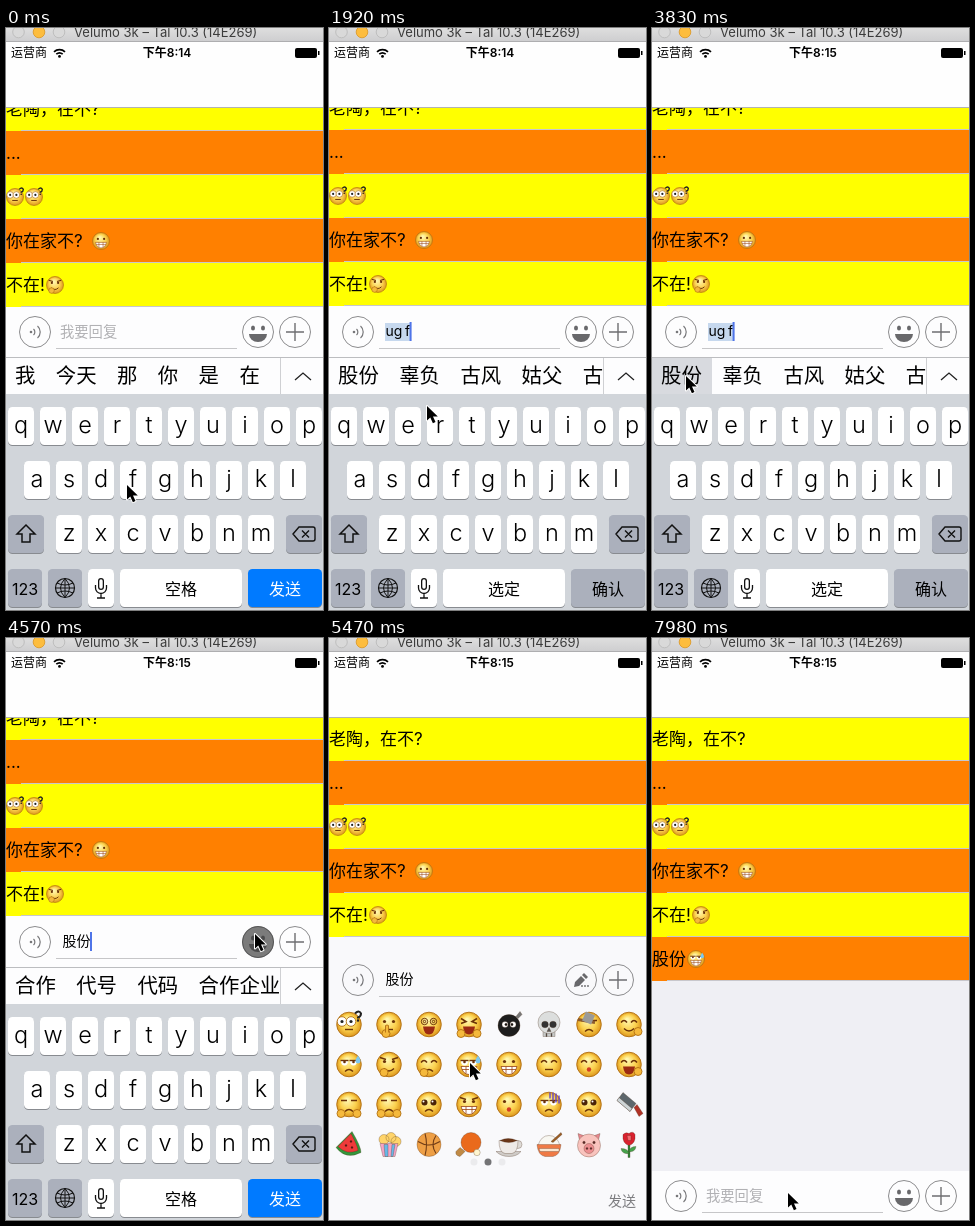
Write an HTML page with a canvas that moves like this. It is 317 by 582 pixels and loops after 8 s.

```html
<!DOCTYPE html>
<html lang="zh">
<head>
<meta charset="utf-8">
<style>
html, body { margin: 0; width: 100%; height: 100%; overflow: hidden; background: #fff; }
canvas { display: block; width: 317px; height: 582px; }
</style>
</head>
<body>
<canvas id="stage" width="317" height="582"></canvas>
<script>
const ctx = document.getElementById('stage').getContext('2d');
const W = 317, H = 582, LOOP = 8000, STEP = 147.2;
const FONT = 'Inter, "Noto Sans CJK SC", "Noto Sans CJK", sans-serif';

// Motion tracks: [step, values...], linear in between
const POINTER = [[0, 121, 457], [2, 203, 400], [3, 204, 398], [5, 158, 452], [6, 156, 451], [8, 124, 455],
  [9, 122, 450], [13, 98, 378], [16, 92, 385], [20, 283, 474], [22, 260, 455], [24, 85, 385], [26, 34, 348],
  [27, 35, 347], [30, 235, 302], [31, 249, 296], [32, 225, 318], [33, 157, 368], [35, 150, 405], [37, 141, 425],
  [38, 140, 427], [39, 140, 427], [44, 278, 553], [46, 293, 561], [47, 293, 562], [53, 140, 557], [54, 136, 555]];
const LIST = [[0, -20], [1, -21], [31, -21], [32, -14], [33, -3], [34, 0]];
const BAR = [[0, 304], [31, 304], [32, 312], [33, 327], [34, 340], [35, 342], [46, 342], [47, 345], [48, 455], [49, 542], [50, 558]];
const BAR_TOP = [[0, 279], [1, 278], [31, 278], [32, 282], [33, 290], [34, 297], [35, 299], [46, 299], [47, 320], [48, 430], [49, 517], [50, 533]];
const KEYBOARD = [[0, 0], [31, 0], [32, 95], [33, 226], [34, 253]];

function track(keys, k) {
  const i = keys.findIndex(key => key[0] >= k);
  if (i < 0) return keys[keys.length - 1].slice(1);
  if (i === 0) return keys[0].slice(1);
  const a = keys[i - 1], b = keys[i], p = (k - a[0]) / (b[0] - a[0]);
  return a.slice(1).map((v, j) => Math.round(v + (b[j + 1] - v) * p));
}
// Latest entry whose step has been reached
const latest = (list, k) => list.filter(e => e[0] <= k).pop()[1];

function rect(x, y, w, h, fill) { ctx.fillStyle = fill; ctx.fillRect(x, y, w, h); }
function roundRect(x, y, w, h, r, fill) {
  ctx.fillStyle = fill; ctx.beginPath(); ctx.roundRect(x, y, w, h, r); ctx.fill();
}
function text(str, x, midY, size, color = '#000', align = 'left', weight = 400) {
  ctx.font = `${weight} ${size}px ${FONT}`;
  ctx.textAlign = align;
  ctx.fillStyle = color;
  ctx.fillText(str, x, midY + size * .36);
}
const fill = (d, color) => { ctx.fillStyle = color; ctx.fill(new Path2D(d)); };
function stroke(d, color, width = 1) {
  ctx.strokeStyle = color; ctx.lineWidth = width; ctx.stroke(new Path2D(d));
}
const circle = (x, y, r) => `M${x - r} ${y}a${r} ${r} 0 1 0 ${2 * r} 0a${r} ${r} 0 1 0 ${-2 * r} 0z`;
function at(x, y, scale, draw) {
  ctx.save(); ctx.translate(x, y); ctx.scale(scale, scale); draw(); ctx.restore();
}

// ---- stickers, drawn in a 26 unit box around the origin ----
const BROWN = '#6b3208', SKIN = '#f5b93c', EDGE = '#b06f12';
const both = draw => [-4.5, 4.5].forEach(draw);
const EYES = {
  dot: () => both(x => fill(circle(x, -3, 1.6), BROWN)),
  big: () => [-7, 2].forEach(x => { fill(circle(x, -3, 4.8), '#fff'); stroke(circle(x, -3, 4.8), EDGE, .9); fill(circle(x, -3, 1.6), '#222'); }),
  spiral: () => both(x => { stroke(circle(x, -3, 3.2), BROWN); stroke(circle(x, -3, 1.2), BROWN); }),
  squeeze: () => stroke('M-8-6l5 3-5 2M8-6l-5 3 5 2', BROWN, 1.6),
  flat: () => stroke('M-8-4h6M2-4h6', BROWN, 1.6),
  arc: () => stroke('M-8-2q3-4 6 0M2-2q3-4 6 0', BROWN, 1.5),
  half: () => both(x => { fill(`M${x - 3.5}-4h7q0 5-3.500 5t-3.500-5z`, '#fff'); stroke(`M${x - 4}-4h8`, BROWN, 1.4); fill(circle(x, -2.5, 1.3), BROWN); }),
  wet: () => both(x => { fill(circle(x, -2, 3), '#4b2408'); fill(circle(x - 1, -3, 1), '#fff'); }),
  sly: () => { stroke('M-9-7l6 2M9-7l-6 2', BROWN, 1.5); EYES.dot(); }
};
const MOUTHS = {
  smile: () => stroke('M-5 4q5 5 10 0', BROWN, 1.4),
  frown: () => stroke('M-4 7q4-4 8 0', BROWN, 1.4),
  flat: () => stroke('M-4 5h8', BROWN, 1.4),
  grin: () => { fill('M-8 2h16q-2 8-8 8t-8-8z', '#fff'); stroke('M-8 2h16q-2 8-8 8t-8-8zM-7 5h14M-3 2v7M3 2v7', '#9a4515', .8); },
  open: () => fill('M-6 2h12q-1 8-6 8t-6-8z', '#9c2a12'),
  kiss: () => fill(circle(0, 5, 2.2), '#d23b22')
};
const hand = (x, y) => { fill(circle(x, y, 4), SKIN); stroke(circle(x, y, 4), EDGE, .9); };
const EXTRAS = {
  question: () => { stroke('M6-11q4-4 6 0q0 3-3 4v1', '#222', 2); fill(circle(9, -4, 1.2), '#222'); },
  finger: () => { hand(-3, 9); fill('M-3.500 1q1.500-1 3 0v7h-3z', SKIN); stroke('M-3.500 8v-7q1.500-1 3 0v7', EDGE, .9); },
  hand: () => hand(-5, 8),
  right: () => hand(9, 7),
  hands: () => { hand(-8, 9); hand(8, 9); },
  sweat: () => fill('M9-9q5 7 0 8q-5-1 0-8z', '#7cc8f2'),
  tear: () => fill('M-6 0q4 6 0 7q-4-1 0-7z', '#7cc8f2'),
  lines: () => stroke('M1-12v6M4-12v8M7-11v9M10-9v8', '#6547c8', 1.4),
  hammer: () => { stroke('M-11-5L6-2', '#8c5a2c', 3); fill('M-3-13l9 4-4 9-9-4z', '#9a9a98'); }
};
function face(eyes, mouth, ...extras) {
  const g = ctx.createRadialGradient(-2, -5, 1, 0, 0, 12.5);
  g.addColorStop(0, '#fff7ae'); g.addColorStop(.6, '#fbd04c'); g.addColorStop(1, '#dc951c');
  fill(circle(0, 0, 12.3), g);
  stroke(circle(0, 0, 12.3), EDGE, .9);
  EYES[eyes](); MOUTHS[mouth]();
  extras.forEach(e => EXTRAS[e]());
}
const OBJECTS = {
  bomb: [['M7-8l4-5 2 3-4 4z', '#777'], [circle(0, 1, 11), '#1d1d1d'], [circle(-4, 0, 3), '#fff'], [circle(4, 0, 3), '#fff'], [circle(-3, 0, 1.2), '#111'], [circle(3, 0, 1.2), '#111']],
  skull: [['M-6 5h12v7h-12z', '#c6c9c8'], [circle(0, -2, 11), '#dcdedd'], [circle(-4, 0, 3.3), '#333'], [circle(4, 0, 3.3), '#333'], ['M0 3l2 4h-4zM-3 9h1v3h-1zM2 9h1v3h-1z', '#555']],
  knife: [['M-12-4l6-8 13 11-6 8z', '#5d676c'], ['M-12-4l2-3 13 11-2 3z', '#cdd4d6'], ['M5 3l3-3 6 9-4 3z', '#b03226']],
  melon: [['M-13 3L3-13Q12 2 12 8Q-3 16-13 3z', '#34963b'], ['M-11 2L2-11Q9 2 9 6Q-2 11-11 2z', '#ef3a3a'], [circle(-3, 1, 1) + circle(2, -3, 1) + circle(3, 3, 1), '#511']],
  snack: [[circle(-5, -5, 5) + circle(2, -7, 5) + circle(7, -3, 5), '#ffd46a'], ['M-9-1h18l-3 13h-12z', '#f4a5c6'], ['M-5 0h4v12h-3zM3 0h3l-2 12h-2z', '#68b9e8']],
  ball: [[circle(0, 0, 12), '#ee9f45']],
  paddle: [['M-9 3l5 4-5 5q-5-1-4-5z', '#c08a45'], [circle(2, -2, 10), '#ea6a1c'], [circle(8, 8, 3.2), '#fff6d0']],
  coffee: [['M-13 7h25q-4 5-12 5t-13-5z', '#cfcbc7'], [circle(9, 0, 4), '#dedad6'], ['M-10-4h19q0 12-6 13h-7q-6-1-6-13z', '#eeeae7'], ['M-9-4q8-4 17 0q-8 4-17 0z', '#6a3517']],
  rice: [['M-11 1Q-8-9 0-9t11 10z', '#f8f7f1'], ['M-12 0h24q-1 11-8 12h-8q-7-1-8-12z', '#ef7a45'], ['M-10 4h20v3h-19z', '#fbe6cf'], ['M2-3l10-9 1 2-9 8z', '#9a5d24']],
  pig: [['M-11-11l8 3-6 6zM11-11l-8 3 6 6z', '#e7868d'], [circle(0, 1, 11.5), '#f9c3bd'], [circle(0, 4, 5), '#ec8f91'], [circle(-2, 4, 1) + circle(2, 4, 1) + circle(-5, -2, 1.3) + circle(5, -2, 1.3), '#5d2a2b']],
  rose: [['M-1 0h2v13h-2z', '#2f8a39'], ['M0 9q-7 1-8-5q7 0 8 5zM0 7q6 1 7-5q-6 0-7 5z', '#46a34c'], ['M-6-10q3-3 6-1q4-3 6 1q1 9-6 11q-7-2-6-11z', '#d9222f'], ['M-2-9h4v5h-3z', '#f46a6f']]
};
const STICKERS = `big flat question|dot flat finger|spiral open|squeeze open hands|bomb|skull|flat frown hammer|arc smile right
half frown sweat|sly smile hand|arc frown hand|half grin sweat|dot grin|arc flat|arc kiss|arc open right
flat frown hands|flat frown hands|wet frown|sly grin|dot kiss|half frown lines|wet frown|knife
melon|snack|ball|paddle|coffee|rice|pig|rose`.split(/[|\n]/);

function sticker(index, x, y, size) {
  const parts = STICKERS[index].split(' ');
  at(x, y, size / 26, () => {
    if (parts.length > 1) return face(...parts);
    OBJECTS[parts[0]].forEach(([shape, color]) => {
      fill(shape, color);
      stroke(shape, 'rgba(70,40,20,.4)', .7);
    });
    if (parts[0] === 'ball') stroke('M-11-3Q0 4 11-3M-4-11Q-1 0-4 11M7-9Q1 0 7 9', '#713d17', 1.1);
  });
}

// ---- screen parts ----
function titleAndStatus(k) {
  rect(0, 14, W, 65, '#fefefe');
  const g = ctx.createLinearGradient(0, 0, 0, 14);
  g.addColorStop(0, '#dedede'); g.addColorStop(1, '#cdcdcf');
  rect(0, 0, W, 14, g);
  rect(0, 13, W, 1, '#aeaeb0');
  [['#d9d9d9', '#bebebe', 12.5], ['#fdbd3e', '#dfa033', 33], ['#d9d9d9', '#bebebe', 53]].forEach(([inner, edge, x]) => {
    fill(circle(x, 4, 5.8), inner); stroke(circle(x, 4, 5.8), edge);
  });
  text('Velumo 3k – Tal 10.3 (14E269)', 68, 4.5, 13, '#3c3c3c');
  text('运营商', 5, 25, 12);
  at(53.5, 29, 1, () => {
    stroke('M-5.5-5.2a8 8 0 0 1 11 0M-3.2-2.8a4.8 4.8 0 0 1 6.4 0', '#000', 1.7);
    fill(circle(0, -.6, 1.4), '#000');
  });
  text(k < 20 ? '下午8:14' : '下午8:15', 161, 25, 12, '#000', 'center', 600);
  roundRect(289, 20, 22, 10, 2, '#000');
  rect(312, 23, 1.5, 4, '#000');
  rect(0, 79, W, 1, '#b2b2b2');
}

const MESSAGES = [['老陶，在不?'], ['...'], ['', [0, 9], [0, 28]], ['你在家不?', [12, 95]], ['不在!', [9, 49]], ['股份', [11, 44]]];
function messageList(k, bottom) {
  const [offset] = track(LIST, k);
  ctx.save();
  ctx.beginPath(); ctx.rect(0, 79, W, bottom - 79); ctx.clip();
  rect(0, 79, W, bottom - 79, '#efeff4');
  MESSAGES.slice(0, k < 47 ? 5 : 6).forEach(([label, ...icons], i) => {
    const y = 79 + offset + i * 44;
    rect(0, y, W, 44, i % 2 ? '#ff8000' : '#ffff00');
    rect(15, y + 43, W, 1, '#c8c7cc');
    text(label, 0, y + 22, 17);
    icons.forEach(([index, x]) => sticker(index, x, y + 22, 18));
  });
  ctx.restore();
}

const INPUT = [[0, ''], [3, 'u'], [6, 'ug'], [9, 'ug\u2009f'], [28, '股份'], [38, '股份[糗大了]'], [47, '']];
function inputBar(k, y, top, panel) {
  rect(0, top, W, H - top, panel ? '#f9f9fb' : '#fdfdfe');
  const gray = '#77777a';
  [29, 252, 289].forEach(x => stroke(circle(x, y, 15.5), '#8c8c8e'));
  at(29, y, 1, () => {
    fill(circle(-4, 0, 1.3), gray);
    stroke('M-1.5-3a4 4 0 0 1 0 6M2.5-6a8 8 0 0 1 0 12', gray, 1.2);
  });
  at(252, y, 1, () => {
    if (panel) {
      fill('M-7 7l1-5 6-6 4 4-6 6zM1-5l2-2 4 4-2 2z', '#68686b');
      fill(circle(1, 6, .9) + circle(4, 6, .9) + circle(7, 6, .9), '#68686b');
    } else {
      fill('M-7-4a2 2.500 0 0 1 4 0a2 2.500 0 0 1-4 0zM3-4a2 2.500 0 0 1 4 0a2 2.500 0 0 1-4 0z', '#68686b');
      fill('M-9 2h18a9 8 0 0 1-18 0z', '#68686b');
    }
    if (k === 31) fill(circle(0, 0, 16), 'rgba(60,60,60,.68)');
  });
  stroke(`M280 ${y}h18M289 ${y - 9}v18`, '#6e6e71', 1.4);
  rect(50, y + 16, 181, 1, '#c6c6c8');

  const value = latest(INPUT, k);
  if (!value) return text('我要回复', 54, y, 14.3, '#b1b1b4');
  ctx.font = `400 14px ${FONT}`;
  const width = ctx.measureText(value).width;
  if (k < 28) rect(56, y - 9, width + 1, 18, '#c6d8ee');
  text(value, 56.5, y - .7, 14);
  if (k < 32) rect(56 + width, y - 10, 2, 19, '#4f74e8');
}

function stickerPanel(k, y) {
  STICKERS.forEach((_, i) => sticker(i, 20 + i % 8 * 40, y + 44.5 + (i >> 3) * 40, 26));
  if (k > 33) [145, 173].forEach(x => fill(circle(x, y + 182, 3.5), '#ebebed'));
  fill(circle(159, y + 182, 3.5), '#747476');
  text('发送', 293, y + 221, 14, '#7c7c7f', 'center');
}

const CANDIDATES = [[0, '我 今天 那 你 是 在'], [3, '是 上 说 事 时 使'], [6, '股 古 故 顾 骨 鼓'],
  [9, '股份 辜负 古风 姑父 古方'], [28, '合作 代号 代码 合作企业'], [32, '']];
const DARK_KEY = '#abb0bc';
function keyCap(x, y, w, color = '#fff') {
  roundRect(x, y + 1, w, 38, 4.5, '#888b90');
  roundRect(x, y, w, 38, 4.5, color);
}
function letterKey(x, y, letter) {
  keyCap(x, y, 26);
  text(letter, x + 13, y + 17.5, 23.5, '#000', 'center', 300);
}
function wordKey(x, w, label, color, ink = '#000') {
  keyCap(x, 541, w, color);
  text(label, x + w / 2, 561, 16, ink, 'center');
}
function keyboard(k, offset) {
  if (offset > 252) return;
  const composing = k >= 3 && k < 28;
  ctx.save();
  ctx.translate(0, offset);
  rect(0, 329, W, 253, '#d1d5da');
  rect(0, 329, W, 37, k < 32 ? '#fdfdfe' : '#f9f9fb');
  rect(0, 329, W, 1, '#bcbdc0');
  if (k === 26 || k === 27) rect(0, 330, 60, 36, '#d8dadf');

  ctx.save();
  ctx.beginPath(); ctx.rect(0, 330, 274, 36); ctx.clip();
  let left = 9;
  latest(CANDIDATES, k).split(' ').forEach(word => {
    text(word, left, 348, 20.4);
    left += word.length * 20.4 + 20.4;
  });
  ctx.restore();
  if (k < 32) {
    rect(274, 330, 1, 36, '#cfd0d3');
    stroke('M289 352l8-7 8 7', '#222', 1.3);
  }

  [['qwertyuiop', 2], ['asdfghjkl', 18], ['zxcvbnm', 50]].forEach(([letters, x], row) =>
    [...letters].forEach((c, i) => letterKey(x + i * 32, 379 + row * 54, c)));
  keyCap(2, 487, 36, DARK_KEY);
  keyCap(280, 487, 36, DARK_KEY);
  keyCap(42, 541, 34, DARK_KEY);
  keyCap(82, 541, 26);
  wordKey(2, 34, '123', DARK_KEY);
  wordKey(114, 122, composing ? '选定' : '空格');
  if (composing) wordKey(242, 74, '确认', DARK_KEY);
  else wordKey(242, 74, '发送', '#007aff', '#fff');

  stroke('M20 497l-9 9h5v8h8v-8h5z', '#111', 1.5);
  stroke('M287 506l6-7h14q2 0 2 2v10q0 2-2 2h-14zM296 502.500l7 7M303 502.500l-7 7', '#111', 1.4);
  at(59, 560, 1, () => {
    stroke(circle(0, 0, 9.5), '#111', 1.2);
    stroke('M-9.500 0h19M0-9.500v19M0-9.500q-9 9.500 0 19M0-9.500q9 9.500 0 19M-8-5q8 4 16 0M-8 5q8-4 16 0', '#111', 1);
  });
  roundRect(92, 550, 6, 12, 3, '#111');
  roundRect(93.3, 551.3, 3.4, 9.4, 1.7, '#fff');
  stroke('M89.500 557v3a5.500 5.500 0 0 0 11 0v-3M95 566v4M91 570h8', '#111', 1.3);
  ctx.restore();
}

function pointer(k) {
  const [x, y] = track(POINTER, k);
  at(x, y, 1, () => {
    const arrow = 'M0 0v14.500l3.300-3 2.600 5.700 2.600-1.200-2.500-5.500h4.800z';
    ctx.lineJoin = 'round';
    stroke(arrow, '#fff', 2);
    fill(arrow, '#000');
    ctx.lineJoin = 'miter';
  });
}

function draw(now) {
  const k = Math.floor(now % LOOP / STEP);
  const [barY] = track(BAR, k), [barTop] = track(BAR_TOP, k), [drop] = track(KEYBOARD, k);
  messageList(k, barTop);
  inputBar(k, barY, barTop, k >= 32 && k < 47);
  if (k >= 32 && k < 50) stickerPanel(k, barY);
  keyboard(k, drop);
  titleAndStatus(k);
  pointer(k);
}
let start;
function tick(now) {
  start ??= now;
  draw(now - start);
  requestAnimationFrame(tick);
}
draw(0);
requestAnimationFrame(tick);
</script>
</body>
</html>
```
